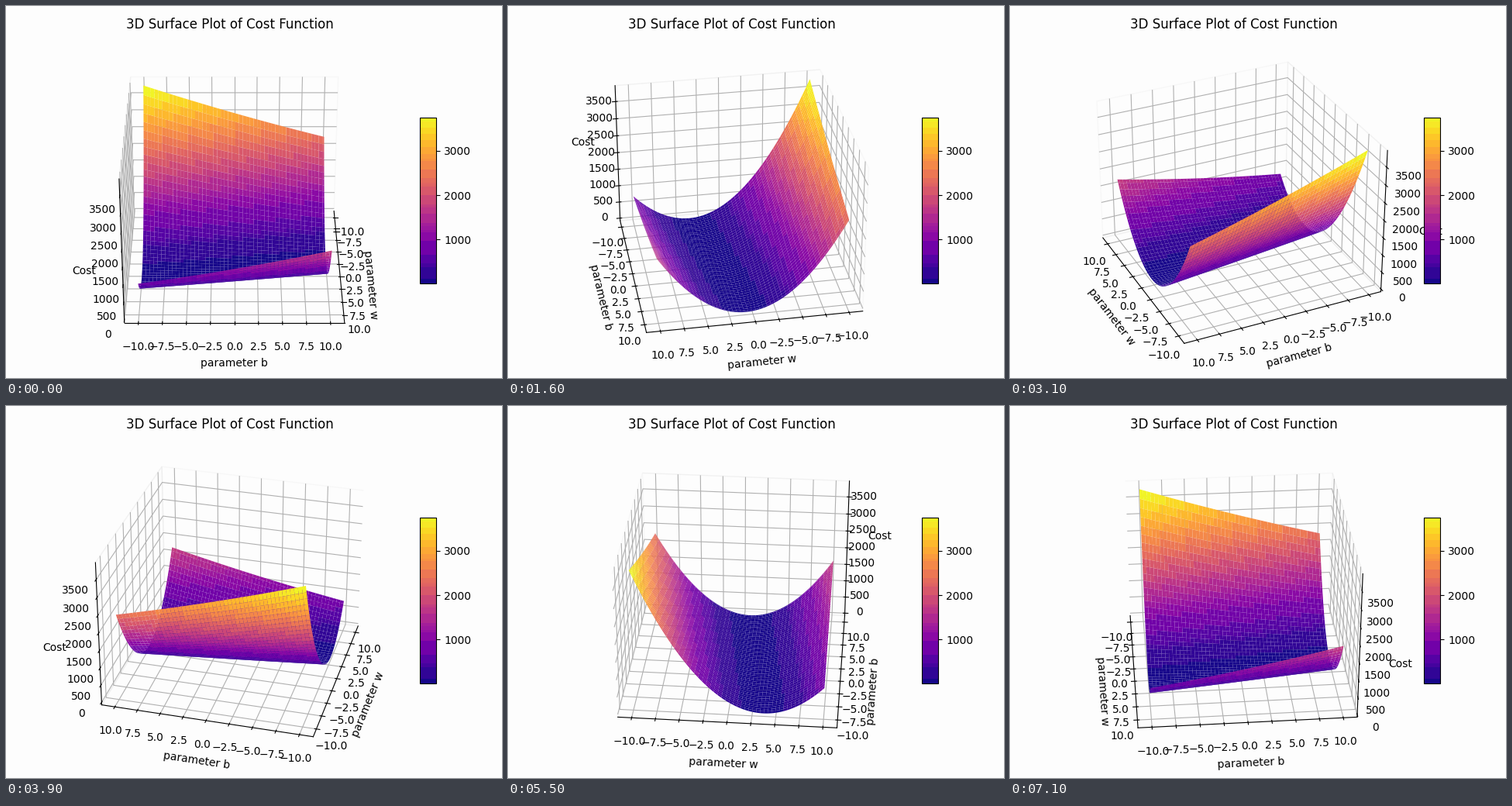
A matplotlib script for the animation above (7200 ms loop, 640 by 480 pixels).

```python
import numpy as np
import matplotlib.pyplot as plt
from matplotlib.animation import FuncAnimation
from matplotlib.colors import ListedColormap

WIDTH, HEIGHT, DPI = 640, 480, 100
FRAMES, INTERVAL = 72, 100
BACKGROUND = "#fdfdfd"


def cost(w, b):
    """Squared-error cost of a line fit, a quadratic bowl in w and b."""
    return 20.65 * w**2 + 6.12 * w * b + b**2 / 2 - 91.1 * w - 13.8 * b + 103.75


def banded_plasma():
    """Plasma in flat steps: shades in one coarse RGB cell share their mean."""
    rgb = plt.get_cmap("plasma")(np.arange(256))[:, :3]
    cells = (rgb * 255).astype(int) // [32, 16, 32]
    ids = cells @ [256, 16, 1]
    return ListedColormap([rgb[ids == i].mean(axis=0) for i in ids])


def pixel_box(left, bottom, width, height):
    return [left / WIDTH, bottom / HEIGHT, width / WIDTH, height / HEIGHT]


fig = plt.figure(figsize=(WIDTH / DPI, HEIGHT / DPI), dpi=DPI,
                 facecolor=BACKGROUND)
ax = fig.add_axes(pixel_box(74.75, 14.6, 428.5, 428.5), projection="3d")
ax.set_facecolor("none")
ax.margins(x=0.05, y=0.05, z=0)

values = np.linspace(-10, 10, 100)
w, b = np.meshgrid(values, values)
surface = ax.plot_surface(w, b, cost(w, b), cmap=banded_plasma())

ax.set_title("3D Surface Plot of Cost Function")
ax.set_xlabel("parameter w")
ax.set_ylabel("parameter b")
ax.set_zlabel("Cost")
for axis in (ax.xaxis, ax.yaxis, ax.zaxis):
    axis.pane.fill = False

bar_ax = fig.add_axes(pixel_box(533.9, 121.8, 21.4, 214.2))
fig.colorbar(surface, cax=bar_ax)


def update(frame):
    ax.view_init(elev=30, azim=frame * 360 / FRAMES)
    return ()


anim = FuncAnimation(fig, update, frames=FRAMES, interval=INTERVAL,
                     init_func=lambda: update(0), repeat=True, blit=False)
plt.show()
```
